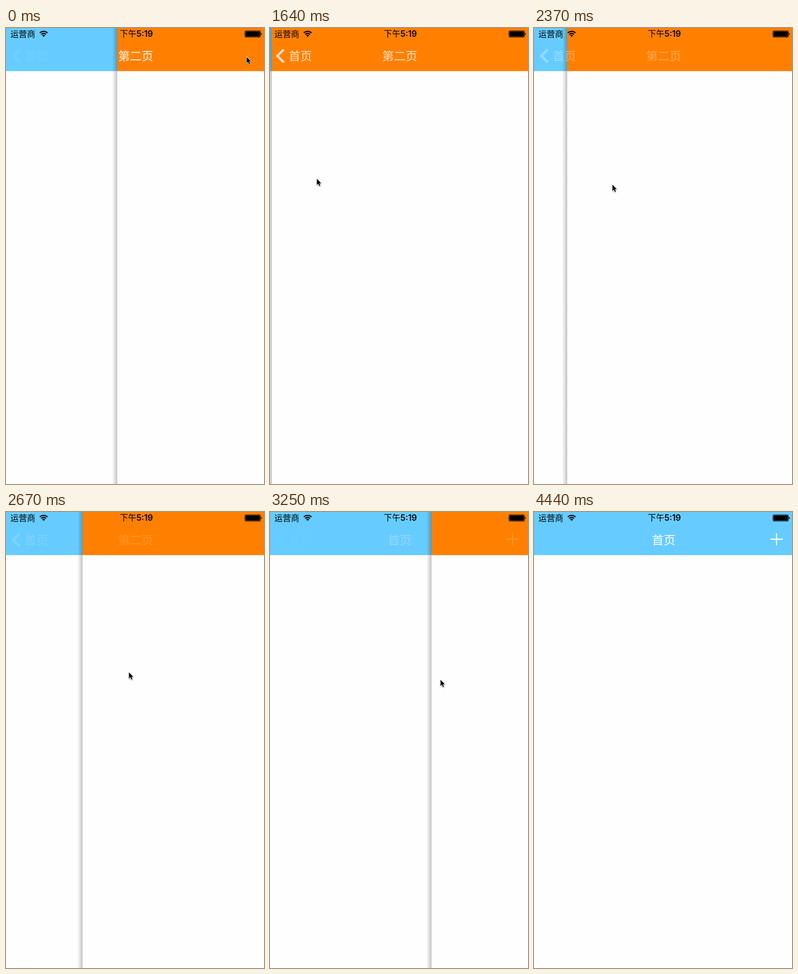
Animation, 559 px wide and 989 px high, one loop 5040 ms. Source, as an HTML page:

```html
<!DOCTYPE html>
<html lang="zh-CN">
<head>
<meta charset="utf-8">
<style>
  html, body { margin: 0; height: 100%; overflow: hidden; background: #fefefe; }
  svg { display: block; width: 100vw; height: 100vh; }
  text { font-family: Inter, "Noto Sans CJK SC", "Noto Sans CJK", sans-serif; }
  .nav { fill: #fff; font-size: 25.3px; }
  .title { font-weight: 500; text-anchor: middle; }
  .status { font-size: 18px; }
  .line { fill: none; stroke: #fff; }
  #cursor { filter: drop-shadow(0 1px 1px #0006); }
</style>
</head>
<body>
<svg viewBox="0 0 559 989">
  <defs>
    <linearGradient id="shade">
      <stop offset="0" stop-opacity="0"/>
      <stop offset="1" stop-opacity=".23"/>
    </linearGradient>
  </defs>
  <rect width="559" height="989" fill="#fefefe"/>
  <rect width="559" height="93.5" fill="#66ccff"/>

  <g id="page">
    <rect x="-11" width="11" height="989" fill="url(#shade)"/>
    <rect width="559" height="989" fill="#fefefe"/>
    <rect width="559" height="93.5" fill="#ff8000"/>
  </g>

  <g id="back">
    <path class="line" stroke-width="5" d="M29.7 46.8 15.9 60.6 29.7 74.4"/>
    <text class="nav" x="40.5" y="70">首页</text>
  </g>
  <text id="second" class="nav title" x="281" y="70">第二页</text>
  <text id="home" class="nav title" x="281" y="70">首页</text>
  <path id="plus" class="line" stroke-width="2.4" d="M512 59h27M525.5 46v26.5"/>

  <g class="status">
    <text x="9.5" y="19.6">运营商</text>
    <text x="246.5" y="19.4" font-weight="500">下午<tspan font-weight="600">5:19</tspan></text>
    <path fill="none" stroke="#000" stroke-width="2.5"
          d="M73.2 10.7a11.7 11.7 0 0 1 16.6 0M76.3 13.8a7.4 7.4 0 0 1 10.4 0"/>
    <path d="M81.5 19.3 78.2 16a4.7 4.7 0 0 1 6.6 0z"/>
    <rect x="517.5" y="6" width="34" height="14" rx="2.5" fill="none" stroke="#000"/>
    <rect x="518.8" y="7.3" width="31.4" height="11.4" rx="1.3"/>
    <path d="M552.5 10.5q1.8.6 1.8 2.5t-1.8 2.5z"/>
  </g>

  <path id="cursor" stroke="#fff" stroke-width="1.6" paint-order="stroke"
        d="M0 0V13.2L3 10.3 5.3 15.6 7.4 14.7 5.2 9.5H9.3z"/>
</svg>
<script>
  const WIDTH = 559, LOOP = 5040, STEP = 148, LAST = 30, PUSH_END = 6;
  const $ = id => document.getElementById(id);
  const mix = (a, b, k) => a + (b - a) * k;
  const clamp = k => Math.min(1, Math.max(0, k));
  const smooth = k => k * k * (3 - 2 * k);

  // Key points of the drag: step, page edge, cursor x, cursor y.
  const drag = [
    [6, 0, 61.5, 309], [10, 0, 98, 326], [14, 14, 112.5, 331], [16, 72, 170, 340],
    [18, 166, 266.5, 348], [22, 350, 369.5, 364], [24, 460, 446, 383], [28, 704, 584, 411]
  ];

  function pushPose(step) {
    const k = smooth(clamp((step - 2) / 4));
    return [241 * clamp(1 - step / 3) ** 3, mix(521.5, 61.5, k), mix(63, 309, k)];
  }

  function dragPose(step) {
    const i = Math.max(1, drag.findIndex(key => key[0] >= step));
    const [from, to] = step > 28 ? drag.slice(-2) : [drag[i - 1], drag[i]];
    const k = clamp((step - from[0]) / (to[0] - from[0]));
    return [1, 2, 3].map(n => mix(from[n], to[n], k));
  }

  const place = (id, x, y) => $(id).setAttribute("transform", `translate(${x} ${y})`);
  const fade = (id, alpha) => $(id).setAttribute("opacity", alpha);

  function draw() {
    const time = performance.now() % LOOP;
    const step = Math.min(LAST, Math.floor((time + 6) / STEP));
    const pushing = step < PUSH_END;
    const [edge, x, y] = pushing ? pushPose(step) : dragPose(step);
    const open = clamp(edge / WIDTH);
    const leaving = (1 - open ** 0.4) ** 2;

    place("page", Math.round(edge), 0);
    place("cursor", x, y);
    fade("back", leaving);
    fade("second", pushing ? 1 - open ** 3 : leaving);
    fade("home", open ** 3);
    fade("plus", open ** 4);
    requestAnimationFrame(draw);
  }
  draw();
</script>
</body>
</html>
```
